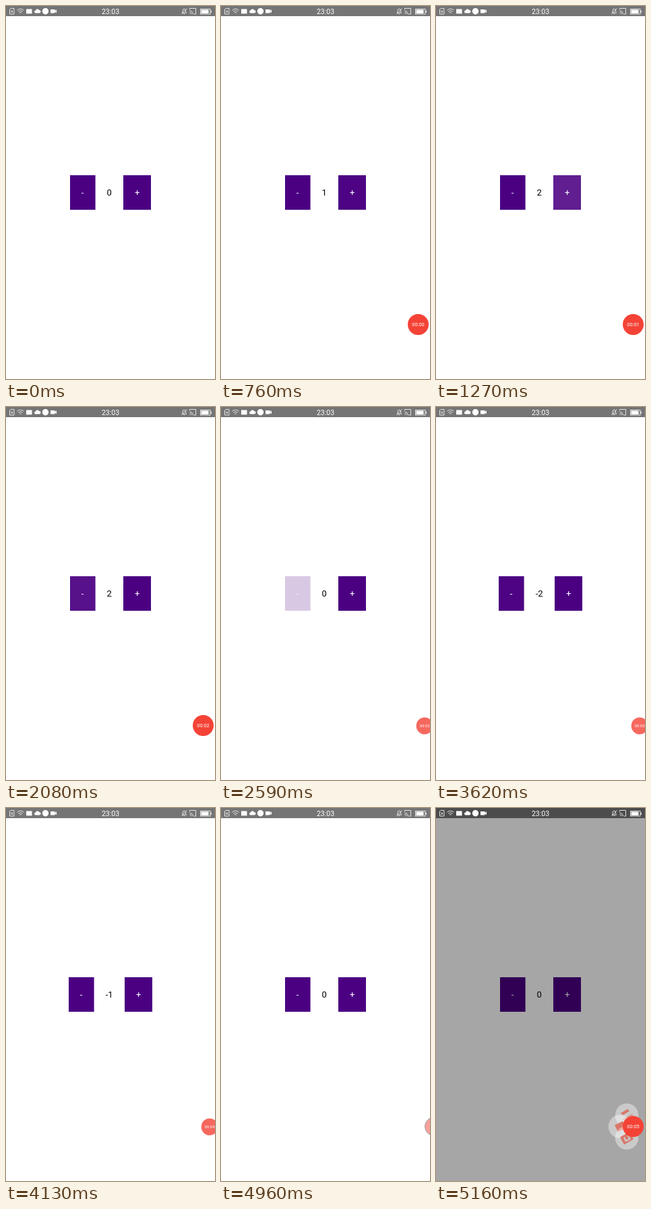
An HTML page for the animation above (5270 ms loop, 310x551 px).

```html
<!DOCTYPE html>
<html lang="en">
<head>
<meta charset="utf-8">
<title>Counter</title>
<style>
  html, body { margin: 0; width: 100%; height: 100%; overflow: hidden; background: #fff; }
  svg { display: block; width: 310px; height: 551px; }
  text { font: 13px Roboto, sans-serif; text-anchor: middle; fill: #fff; }
  .line { fill: none; stroke: #eee; stroke-width: .9; }
</style>
</head>
<body>
<svg viewBox="0 0 310 551">
  <rect width="310" height="15" fill="#757575"/>

  <g id="minus">
    <rect x="95" y="250" width="37.6" height="51" fill="#4b0082"/>
    <text x="113.5" y="280.3">-</text>
  </g>
  <text id="count" x="153.2" y="280.3" style="fill:#000"></text>
  <g id="plus">
    <rect x="174" y="250" width="41" height="51" fill="#4b0082"/>
    <text x="194.6" y="280.3">+</text>
  </g>

  <rect id="dim" width="310" height="551"/>

  <!-- status bar -->
  <g class="line">
    <path d="M7 3.5h5v8.500h-6.500v-7zM7.300 6.500l3 3.500m0-3.500l-3 3.500"/>
    <path d="M16.500 6.200q5-4 10 0M18.200 8.200q3.300-2.600 6.600 0M19.900 10.200q1.600-1.200 3.200 0"/>
    <path d="M261.500 10.200h6q-1-1-1-3.200q0-2.800-2.200-2.800t-2.200 2.800q0 2.200-.600 3.200M263.600 11.700h1.500M260.500 12l8-8.500"/>
    <path d="M272.500 5.500v-2h9v8.500h-3M272.500 7q4.500.500 5 5M272.500 9.300q2.300.300 2.700 2.700M272.500 11.500v.5"/>
    <rect x="288.500" y="4.500" width="14.500" height="7.500"/>
  </g>
  <g fill="#fff">
    <rect x="30" y="4.500" width="8.500" height="6.800"/>
    <path d="M44 10.500a2 2 0 0 1 0-4a2.700 2.700 0 0 1 5-.5a2.200 2.200 0 0 1 .500 4.500z"/>
    <circle cx="58.500" cy="7.700" r="4.700"/>
    <path d="M66 5h6.500v2l2.500-1.700v5l-2.500-1.700v2h-6.500z"/>
    <path d="M289.500 5.500h11v5.500h-11zM303.500 6.800h1.300v3h-1.300z"/>
  </g>
  <text x="155" y="11.800" style="font-size:10.500px">23:03</text>

  <!-- recorder menu -->
  <g id="menu" fill="#d9776a">
    <g><circle r="17.300" fill="#fff" opacity=".4"/>
      <path d="M-9-3l10-6 3 3-10 6z"/><path d="M-6 6L8-2l2 4L-3 9z" opacity=".6"/></g>
    <g><circle r="17.300" fill="#fff" opacity=".4"/>
      <path d="M-8-2L4-8 9 2-3 8z"/></g>
    <g><circle r="17.300" fill="#fff" opacity=".4"/>
      <path d="M-10-1L4-9l6 11-14 8zM-5 0l3 6 8-4-3-6z" fill-rule="evenodd"/><circle r="2.500"/></g>
  </g>
  <g id="bubble">
    <circle r="15.500" fill="#f44336"/>
    <text id="timer" y="2.700" style="font-size:7.400px"></text>
  </g>
  <circle id="hidden" cx="316" cy="470.500" r="13.500" fill="#f44336" fill-opacity=".5" stroke="#999"/>
</svg>

<script>
const LOOP = 5270;
const $ = id => document.getElementById(id);
const clamp = x => Math.min(1, Math.max(0, x));
const ease = x => x < .5 ? 2 * x * x : 1 - 2 * (1 - x) ** 2;
const progress = (t, from, length) => clamp((t - from) / length);

const bursts = [
  [120, 560, 5], [760, 1270, 6], [1380, 1880, 6], [1980, 2490, 6], [2590, 3100, 6],
  [3320, 3720, 5], [3920, 4130, 3], [4450, 4960, 6], [5060, 5160, 2]
];
const refreshes = [0, ...bursts.flatMap(([a, b, n]) =>
  Array.from({ length: n }, (_, i) => Math.floor((a + (b - a) * i / (n - 1)) / 10) * 10))];

// Press and release times
const taps = {
  plus: [[85, 250], [745, 1089], [1350, 1500], [3740, 3895], [4420, 4640]],
  minus: [[1700, 1882], [2085, 2235], [2400, 2570], [2690, 2845], [3240, 3395]]
};

const tapOpacity = (t, [press, release]) =>
  1 - .8 * ease(progress(t, press, 150)) + .8 * ease(progress(t, release, 250));
const opacity = (t, name) => Math.min(...taps[name].map(tap => tapOpacity(t, tap)));
const released = (t, name) => taps[name].filter(tap => tap[1] <= t).length;

function draw(t) {
  const count = released(t, 'plus') - released(t, 'minus');
  const shift = count < 0 ? 2 : 0;
  $('count').textContent = count;
  for (const [name, side] of [['minus', -1], ['plus', 1]]) {
    $(name).setAttribute('opacity', opacity(t, name));
    $(name).setAttribute('transform', `translate(${side * shift} 0)`);
  }

  const open = progress(t, 4960, 200);
  $('dim').setAttribute('opacity', .35 * open);
  $('menu').setAttribute('opacity', open);
  [...$('menu').children].forEach((item, i) => {
    const x = 292.5 - (i === 1 ? 19.5 : 9.5) * open;
    const y = 470.5 + (i - 1) * 16.7 * open;
    item.setAttribute('transform', `translate(${x} ${y})`);
  });

  const away = t >= 4860 && t < 5000;
  const dock = t < 5000 ? progress(t, 2350, 200) : 0;
  $('bubble').setAttribute('transform',
    `translate(${292.5 + 9.7 * dock} ${470.5 + .5 * dock}) scale(${1 - .19 * dock})`);
  $('bubble').setAttribute('opacity', t < 120 || away ? 0 : 1 - .2 * dock);
  $('hidden').setAttribute('opacity', away ? 1 : 0);
  $('timer').textContent = '00:0' + Math.floor(t / 1000);
}

function tick() {
  const now = performance.now() % LOOP;
  draw(refreshes.findLast(time => time <= now));
  requestAnimationFrame(tick);
}
tick();
</script>
</body>
</html>
```
